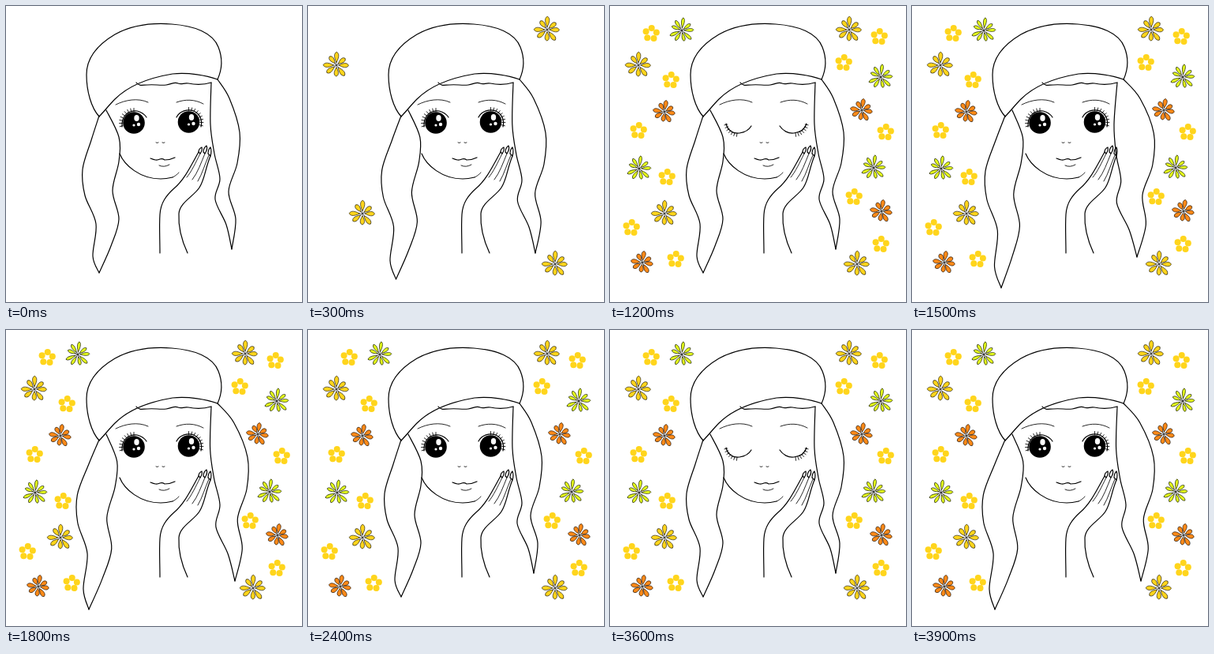
Write an HTML page that moves like this. It is 375 px wide and 375 px high and loops after 4200 ms.

```html
<!DOCTYPE html>
<html lang="en">
<head>
<meta charset="utf-8">
<title>Girl with flowers</title>
<style>
html, body { margin: 0; width: 100%; height: 100%; overflow: hidden; background: #fff; }
svg { display: block; width: 100vw; height: 100vh; }
.ink { fill: none; stroke: #000; stroke-linecap: round; stroke-linejoin: round; stroke-width: 1.2; }
.thin { stroke-width: .85; }
.petal { stroke: #000; stroke-width: .6; stroke-linejoin: round; }
.vein { stroke: #000; stroke-width: .5; }
</style>
</head>
<body>
<svg viewBox="0 0 375 375">
  <g id="flowers"></g>
  <g class="ink">
    <path d="M118 140C108 129 102 108 102 87C102 66 116 49 138 36C158 25 184 21 210 23C239 25 262 34 269 52C275 67 273 82 268 93"/>
    <path d="M118 140C125 133 130 126 138 118C156 100 181 91 211 86C232 84 254 88 268 93"/>
    <path d="M165 97C169 102 173 100 179 100C188 99 195 101 203 100C210 99 213 96 218 98C223 100 225 97 231 98C241 100 250 100 260 97"/>
    <path d="M144 187C150 202 170 219 196 219C202 219 207 218 211 217"/>
    <path class="thin" d="M211 217C214 216 217 213 219 211"/>
    <path class="thin" d="M139 125C151 119 167 116 180 122M216 122C227 118 239 118 250 124"/>
    <path class="thin" d="M190 173Q191 174 193 173M198 173Q200 174 201 173"/>
    <path d="M183 193C188 195 191 196 195 194Q198 193 201 195C206 195 210 194 214 192"/>
    <path class="thin" d="M194 202Q200 205 207 201"/>
  </g>
  <g id="hair" class="ink"></g>
  <g class="ink">
    <path d="M195 313C195 296 194 278 195 264C196 249 203 240 213 231C226 220 234 203 244 185"/>
    <path d="M230 313C223 298 218 281 219 263C220 249 238 241 245 230C252 219 252 207 259 190"/>
    <path class="thin" d="M229 217C235 210 240 199 246 187M236 220C243 211 247 199 252 187M243 222C249 212 252 200 257 189"/>
    <path d="M244 185Q244 181 248 179Q249 183 246 187ZM250 185Q250 180 254 177Q256 181 252 187ZM256 187Q256 182 259 179Q261 184 259 190Z"/>
  </g>
  <g id="open"></g>
  <g id="closed" class="ink">
    <path d="M147 149C149 158 156 162 164 161C171 160 176 157 179 152M215 152C219 158 226 162 233 161C242 160 247 156 249 149"/>
  </g>
</svg>
<script>
const LOOP = 4200, STEP = 300;
const $ = id => document.getElementById(id);
const rad = deg => deg * Math.PI / 180;
const repeat = (n, f) => Array.from({ length: n }, (_, i) => f(i));

// Each strand hangs through a few key points; both strands of a side share a tip.
const strands = [
  { side: "left", edge: "outer", keys: [[118,139], [108,170], [97,207], [100,240], [114,276], [110,317], [118,338]] },
  { side: "left", edge: "inner", keys: [[127,132], [143,166], [143,197], [135,234], [143,270], [133,304], [118,338]] },
  { side: "right", edge: "outer", keys: [[268,93], [283,117], [296,160], [293,199], [282,235], [291,270], [286,308]] },
  { side: "right", edge: "inner", keys: [[260,97], [259,150], [264,187], [271,219], [265,245], [279,277], [286,308]] }
];

// Per side: how far the tip moves, and how far the middle of each edge bulges.
const rest = { left: { x: 0, y: 0, outer: 0, inner: 0 }, right: { x: 0, y: 0, outer: 0, inner: 0 } };
const swing = { left: { x: -13, y: 16, outer: -6, inner: -4 }, right: { x: 4, y: 10, outer: 11, inner: -1 } };
const lift = { left: { x: -5, y: 19, outer: -4, inner: -5 }, right: { x: -1, y: 10, outer: 12, inner: -6 } };
const poses = {
  rest: [rest, 0], half: [swing, .5], swing: [swing, 1], lift: [lift, 1], high: [lift, 1.25]
};
const order = ("rest half swing lift rest lift swing half " +
               "rest high swing lift rest swing").split(" ");

function bend({ side, edge, keys }, [pose, amount]) {
  const p = pose[side];
  return keys.map(([x, y], i) => {
    const u = i / (keys.length - 1);
    return [
      x + amount * (p.x * u * u + p[edge] * Math.sin(Math.PI * u)),
      y + amount * p.y * u * u
    ];
  });
}

// Smooth curve through a list of points.
function curve(points) {
  const at = i => points[Math.max(0, Math.min(points.length - 1, i))];
  const handle = (i, s) => at(i).map((v, c) => (v + s * (at(i + 1)[c] - at(i - 1)[c]) / 6).toFixed(2));
  return "M" + points[0] + points.slice(1).map((p, i) => `C${handle(i, 1)} ${handle(i + 1, -1)} ${p}`).join("");
}

// Short strokes fanning out around an eye.
function lashes(x, y, from, to, count) {
  const d = repeat(count, i => {
    const a = rad(from + (to - from) * i / (count - 1));
    const at = r => `${x + r * Math.cos(a)} ${y + r * Math.sin(a)}`;
    return `M${at(14.5)}L${at(18.5)}`;
  });
  return `<path class="ink thin" d="${d.join("")}"/>`;
}

function eye(x, y) {
  return `<circle cx="${x}" cy="${y}" r="13.8"/><g fill="#fff">` +
    `<ellipse cx="${x + 3.5}" cy="${y - 6}" rx="3.2" ry="4"/>` +
    `<circle cx="${x}" cy="${y + 3}" r="1.6"/><circle cx="${x + 6}" cy="${y + 2}" r="2.2"/></g>`;
}

const kinds = [
  { color: "#ffd51c", size: 17, width: 3, petals: 8, turn: 4, at: [[36,75], [303,30], [69,263], [313,327]] },
  { color: "#ff8a18", size: 14.8, width: 2.9, petals: 8, turn: 12, at: [[69,134], [319,132], [344,260], [41,325]] },
  { color: "#e4fb1c", size: 16.5, width: 2.2, petals: 9, turn: 10, at: [[91,31], [343,90], [37,206], [334,205]] }
];
const dots = [[52,35], [77,94], [36,158], [72,217], [27,281], [83,321],
              [341,39], [296,72], [349,160], [309,242], [343,302]];

function daisy({ color, size, width: w, petals, turn }) {
  return repeat(petals, i => {
    const r = size * (1 - .08 * (i * 2 % 3));
    const a = turn + i * 360 / petals + (i % 2 ? 3 : -3);
    return `<g transform="rotate(${a})"><path class="vein" d="M0 0V${-r * .4}"/>` +
      `<path class="petal" fill="${color}" d="M0 ${-r * .2}C${-w * .7} ${-r * .45} ${-w * 1.3} ${-r * .75} ${-w * .5} ${-r * .92}` +
      `Q0 ${-r * 1.05} ${w * .5} ${-r * .92}C${w * 1.3} ${-r * .75} ${w * .7} ${-r * .45} 0 ${-r * .2}"/></g>`;
  }).join("");
}

function ring() {
  return repeat(5, i => {
    const a = rad(i * 72 - 12);
    return `<circle cx="${7 * Math.cos(a)}" cy="${7 * Math.sin(a)}" r="4"/>`;
  }).join("");
}

const bunch = (places, shape) =>
  `<g fill="#ffd51c">${places.map(p => `<g transform="translate(${p})">${shape}</g>`).join("")}</g>`;

$("flowers").innerHTML = kinds.map(k => bunch(k.at, daisy(k))).join("") + bunch(dots, ring());
$("hair").innerHTML = "<path/>".repeat(strands.length);
$("open").innerHTML = eye(162, 148) + eye(231.5, 147) +
  `<path class="ink" d="M147 153C146 139 155 132 166 133Q174 135 178 141M216 141C220 133 230 130 238 133C246 137 249 145 247 153"/>` +
  lashes(162, 148, 165, 270, 9) + lashes(231.5, 147, 270, 375, 9);
$("closed").innerHTML += lashes(163, 147, 98, 168, 7) + lashes(233, 147, 12, 82, 7);

const hair = [...$("hair").children];
const bunches = [...$("flowers").children];
const show = (el, on) => el.setAttribute("visibility", on ? "visible" : "hidden");

function draw(time) {
  const step = Math.floor(time % LOOP / STEP);
  const pose = poses[order[step]];
  hair.forEach((el, i) => el.setAttribute("d", curve(bend(strands[i], pose))));
  bunches.forEach((el, i) => show(el, step > i));
  const shut = step % 8 === 4;
  show($("open"), !shut);
  show($("closed"), shut);
}

const start = performance.now();
function tick() {
  draw(performance.now() - start);
  requestAnimationFrame(tick);
}
tick();
</script>
</body>
</html>
```
